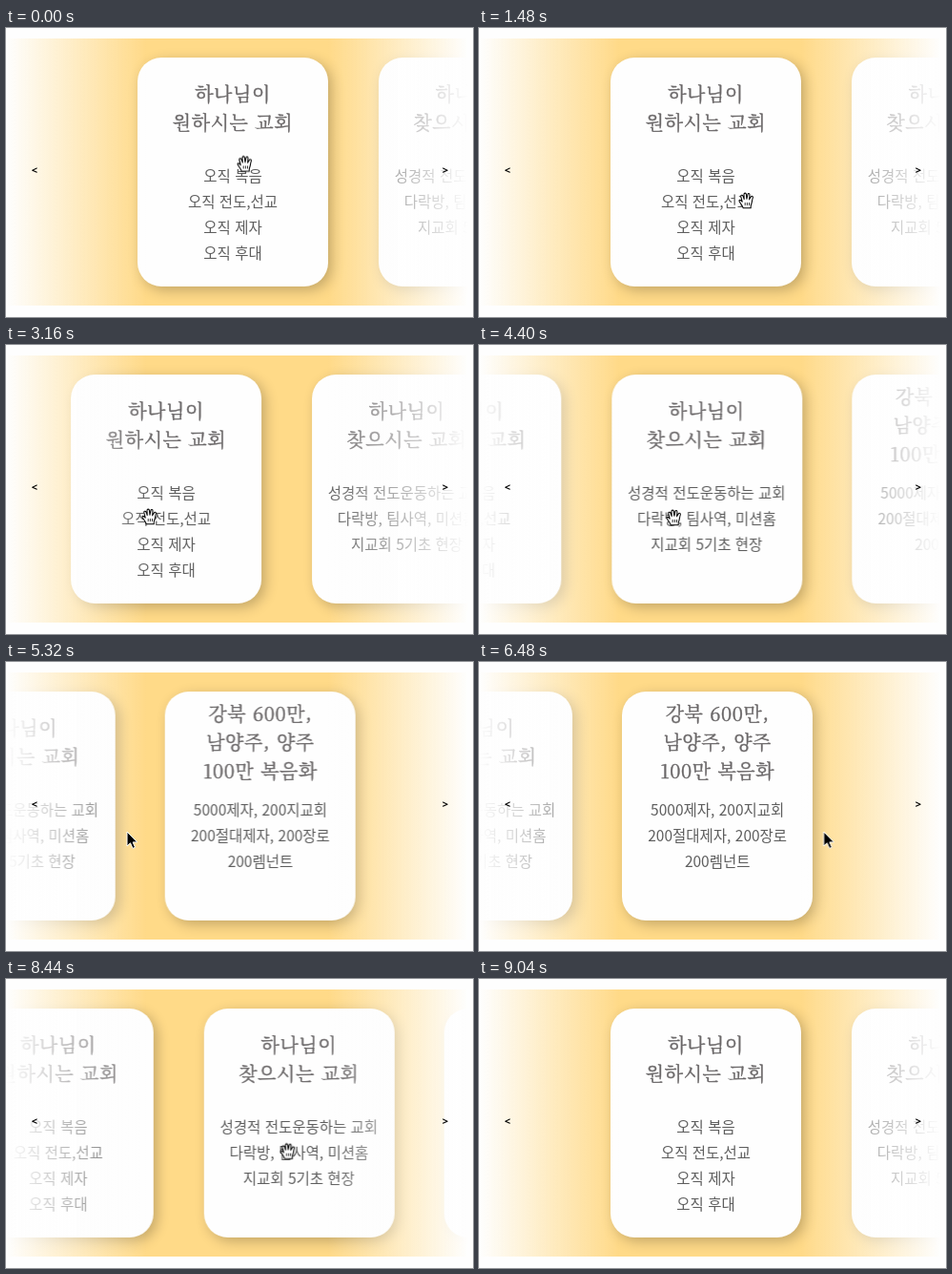
An HTML page for the animation above (10 s loop, 490 by 303 pixels).

```html
<!DOCTYPE html>
<html lang="ko">
<head>
<meta charset="utf-8">
<title>카드 슬라이더</title>
<style>
  html, body { margin: 0; width: 100%; height: 100%; overflow: hidden; background: #fefefe; }
  .stage { position: relative; width: 490px; height: 303px; overflow: hidden; font-family: "Noto Sans CJK KR", "Noto Sans CJK", sans-serif; }
  .band { position: absolute; top: 11px; left: 0; width: 490px; height: 280px; overflow: hidden; background: #ffda88; }
  .fade {
    position: absolute; inset: 0;
    background: linear-gradient(90deg, #fefefe 0, rgba(254,254,254,0) 148px, rgba(254,254,254,0) 337px, #fefefe 485px);
  }

  .track { position: absolute; top: 20px; left: 138px; animation: slide 10s linear infinite; }
  .card {
    position: absolute; top: 0; width: 200px; height: 240px; border-radius: 25px;
    background: #fefefe; box-shadow: 4px 4px 14px rgba(0,0,0,.24);
    text-align: center; white-space: nowrap;
  }
  .card:nth-child(2) { left: 252.6px; }
  .card:nth-child(3) { left: 505.2px; }
  h2, p { position: absolute; left: 0; width: 100%; margin: 0; }
  h2 {
    top: 23px; font: 500 20px/30px "Noto Serif CJK KR", "Noto Sans CJK KR", "Noto Sans CJK", serif;
    letter-spacing: .6px; color: #6a6768; -webkit-text-stroke: .4px #6a6768;
  }
  .card:nth-child(3) h2 { top: 8px; }
  p { top: 110px; font-size: 15.5px; font-weight: 350; line-height: 27px; color: #5e5e5e; }

  .nav { position: absolute; top: 139px; width: 12px; font: bold 11px/20px "Noto Sans", sans-serif; text-align: center; color: #000; }
  .prev { left: 24px; }
  .next { left: 455px; }

  .cursor { position: absolute; left: 0; top: 0; animation: move 10s linear infinite; }
  .cursor svg { position: absolute; overflow: visible; }
  .hand { left: -8.5px; top: -8.5px; animation: hand 10s step-end infinite; }
  .arrow { left: 0; top: 0; animation: arrow 10s step-end infinite; }

  /* Slow drags, each followed by an eased snap to the next card */
  @keyframes slide {
    0%, 20.8% { transform: translateX(0); }
    24.8% { transform: translateX(-44px); }
    26.8% { transform: translateX(-49px); }
    33% { transform: translateX(-76px); animation-timing-function: ease; }
    36.2%, 37.5% { transform: translateX(-252.6px); }
    39.6%, 44% { transform: translateX(-251.6px); }
    51.6% { transform: translateX(-328.6px); animation-timing-function: ease; }
    54.6%, 62.5% { transform: translateX(-505.2px); }
    64.8% { transform: translateX(-493.2px); }
    69% { transform: translateX(-425.2px); animation-timing-function: ease; }
    72%, 76.4% { transform: translateX(-252.6px); }
    77.2%, 78.2% { transform: translateX(-250.4px); }
    85.6% { transform: translateX(-170.4px); animation-timing-function: ease; }
    88.8%, 100% { transform: translateX(0); }
  }
  @keyframes move {
    0%, .2% { transform: translate(250px,141.5px); }
    2.8%, 7.1% { transform: translate(283px,172px); }
    7.2%, 9.9% { transform: translate(282px,172px); }
    11.2%, 13.1% { transform: translate(281px,173px); }
    14.8%, 16.7% { transform: translate(280px,180px); }
    20.8% { transform: translate(220px,180px); }
    24.8% { transform: translate(176px,179px); }
    26.8% { transform: translate(171px,179px); }
    33%, 36% { transform: translate(144px,179px); }
    39.6%, 41.9% { transform: translate(202px,180px); }
    44% { transform: translate(204px,180px); }
    51.6%, 53.4% { transform: translate(127px,178px); }
    59.2%, 62.5% { transform: translate(349px,178px); }
    64.8% { transform: translate(361.5px,178px); }
    69%, 72% { transform: translate(429px,178px); }
    76.4% { transform: translate(226px,178px); }
    77.2%, 78.2% { transform: translate(228.5px,178px); }
    85.6% { transform: translate(308px,180px); }
    90.4%, 100% { transform: translate(322px,198px); }
  }
  /* Open hand over a card, arrow in the gaps */
  @keyframes hand {
    0% { opacity: 1; }
    52.9% { opacity: 0; }
    53.8% { opacity: 1; }
    58.9% { opacity: 0; }
    69.3% { opacity: 1; }
    72.9% { opacity: 0; }
    74% { opacity: 1; }
    87% { opacity: 0; }
    87.9% { opacity: 1; }
    90.4%, 100% { opacity: 0; }
  }
  @keyframes arrow {
    0% { opacity: 0; }
    52.9% { opacity: 1; }
    53.8% { opacity: 0; }
    58.9% { opacity: 1; }
    69.3% { opacity: 0; }
    72.9% { opacity: 1; }
    74% { opacity: 0; }
    87% { opacity: 1; }
    87.9%, 100% { opacity: 0; }
  }
</style>
</head>
<body>
<div class="stage">
  <div class="band">
    <div class="track">
      <section class="card">
        <h2>하나님이<br>원하시는 교회</h2>
        <p>오직 복음<br>오직 전도,선교<br>오직 제자<br>오직 후대</p>
      </section>
      <section class="card">
        <h2>하나님이<br>찾으시는 교회</h2>
        <p>성경적 전도운동하는 교회<br>다락방, 팀사역, 미션홈<br>지교회 5기초 현장</p>
      </section>
      <section class="card">
        <h2>강북 600만,<br>남양주, 양주<br>100만 복음화</h2>
        <p>5000제자, 200지교회<br>200절대제자, 200장로<br>200렘넌트</p>
      </section>
    </div>
    <div class="fade"></div>
  </div>
  <div class="nav prev">&lt;</div>
  <div class="nav next">&gt;</div>
  <div class="cursor">
    <svg class="hand" width="17" height="18" fill="#fff" stroke="#000" stroke-width="1.05" stroke-linejoin="round">
      <path d="M5.2 16.8C4.8 14.8 3.6 13.6 2.4 11.8 1.6 10.6.6 9.6 1 8.8c.5-.8 1.8-.4 2.8 1l.4.4L2.8 5C2.3 3.2 4.4 2.5 5 4.2L6.2 7.6 6 2.6C6 .7 8.2.6 8.4 2.4L8.9 7.3 9.9 2.6C10.3 1 12.2 1.3 12 3.1L11.6 7.8 13.3 5C14.2 3.6 16 4.4 15.3 6.1 14.4 8.4 14.6 11 13.6 13c-.6 1.3-.4 2.5-.4 3.8z"/>
      <path d="M7.2 11v3M9.4 11v3M11.5 11v3" stroke-width=".8"/>
    </svg>
    <svg class="arrow" width="12" height="19" fill="#000" stroke="#fff" stroke-width="1">
      <path d="M0 0V15L3.5 11.8 6 17.4 8.5 16.3 6.1 10.9H10.7Z"/>
    </svg>
  </div>
</div>
</body>
</html>
```
